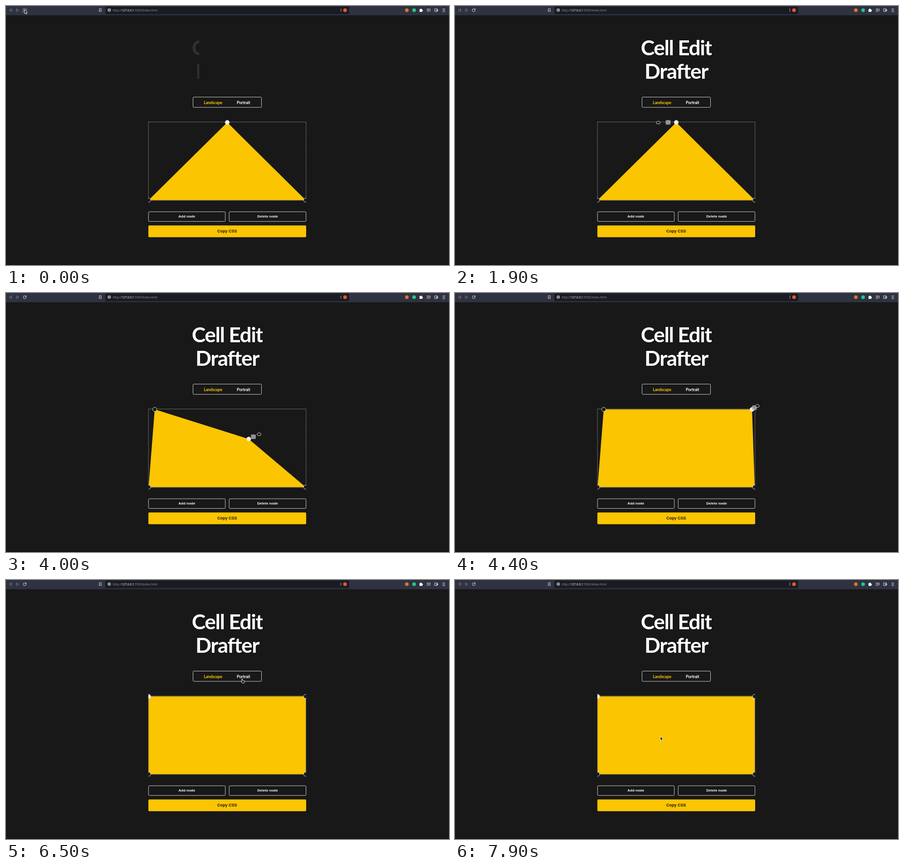
An HTML page for the animation above (8000 ms loop, 977x573 px).

```html
<!DOCTYPE html>
<html lang="en">
<head>
<meta charset="utf-8">
<title>Shape editor</title>
<style>
  html, body { margin: 0; width: 100%; height: 100%; overflow: hidden; background: #181818; }
  svg { display: block; }
  text { text-anchor: middle; font-weight: bold; fill: #fff; }
  .heading { font-family: Lato, sans-serif; letter-spacing: -.03em; }
  .button { font: bold 8px "Liberation Sans", Arial, sans-serif; }
  .url { font: 6.5px "Noto Sans", sans-serif; text-anchor: start; fill: #8b8d94; }
  .line { fill: none; stroke: #fff; stroke-width: .8; }
  .icon { fill: none; stroke: #dcdde2; }
  .gold { fill: #fbc502; }
</style>
</head>
<body>
<svg width="977" height="573" viewBox="0 0 977 573">
  <defs>
    <clipPath id="titleClip"><rect id="titleRect" x="410" y="60" height="120"/></clipPath>
    <clipPath id="stageClip"><rect x="314" y="240" width="348" height="210"/></clipPath>
  </defs>

  <rect width="977" height="20.5" fill="#2f3241"/>
  <rect x="219" y="1" width="538" height="17" rx="2" fill="#1a1c24"/>
  <rect y="572" width="977" height="1" fill="#0d0d0d"/>
  <g class="icon">
    <path d="M12.5 6v6.5l-5.5-3.3z M23 6v6.5l5.5-3.3z" stroke="#7d808c"/>
    <g id="reload">
      <circle cx="41.3" cy="9.2" r="3.2" stroke-dasharray="16 4"/>
      <path d="M45 5v3.5h-3.5z" fill="#dcdde2" stroke="none"/>
    </g>
    <g id="stop">
      <rect x="36" y="4" width="11" height="11" rx="1.5" fill="#50525f" stroke="none"/>
      <path d="M39 6.5l5 5m0-5l-5 5" stroke="#8b8d98"/>
    </g>
    <path d="M205.8 6h4.2v6.5l-2.1-1.7l-2.1 1.7z"/>
    <path d="M738.5 5.5v7" stroke="#aaa"/>
    <path d="M931 6v7" stroke-width="6" stroke-dasharray="1 1.6"/>
    <path d="M935.5 6v5.5"/>
    <path d="M945.2 6.2h6v6h-6z M949 8.4h3.5v2h-3.5z"/>
    <path d="M965.5 6v7" stroke-width="5.5" stroke-dasharray="1 2"/>
  </g>
  <g fill="#fff">
    <rect x="912" y="7" width="6" height="6"/>
    <circle cx="915" cy="7" r="1.3"/>
    <circle cx="918.2" cy="10" r="1.3"/>
  </g>
  <circle cx="227.7" cy="9" r="3.7" fill="#9b9da3"/>
  <path d="M227.7 6.8v4.5" stroke="#1a1c24" stroke-dasharray="2.8 .8"/>
  <text class="url" x="235.5" y="11.5">http://<tspan fill="#fff">127.0.0.1</tspan>:5500/index.html</text>
  <circle cx="747.7" cy="9.3" r="4" fill="#f1562b"/>
  <circle cx="884" cy="9.3" r="4" fill="#d9772b"/>
  <circle cx="900" cy="9.3" r="4" fill="#1fc98b"/>

  <g id="title" class="heading" font-size="46" clip-path="url(#titleClip)">
    <text x="488" y="109">Cell Edit</text>
    <text x="488" y="161">Drafter</text>
  </g>

  <rect class="line" x="412.5" y="201.5" width="151" height="22.7" rx="2"/>
  <g class="heading" font-size="9.2">
    <text id="landscape" x="456.5" y="216.5">Landscape</text>
    <text id="portrait" x="523.7" y="216.5">Portrait</text>
  </g>

  <polygon id="shape" class="gold"/>
  <rect id="frame" y="256.6" height="173.5" fill="none" stroke="#fff" stroke-width=".6" stroke-dasharray="1.5 1"/>
  <g id="nodes" clip-path="url(#stageClip)"></g>

  <g class="line">
    <rect id="add" x="314.3" y="455.2" width="169.4" height="21.4" rx="2"/>
    <rect x="492.2" y="455.2" width="169.4" height="21.4" rx="2"/>
  </g>
  <rect class="gold" x="314" y="485.5" width="348" height="26" rx="2"/>
  <g class="button">
    <text x="398.7" y="468.2">Add node</text>
    <text x="577" y="468.2">Delete node</text>
    <text x="487.8" y="501" style="font-size:9px;fill:#111">Copy CSS</text>
  </g>

  <g id="ghost">
    <rect x="-5.5" y="-5" width="11" height="10" fill="#aaa" opacity=".65"/>
    <circle r="4.3" fill="#999" stroke="#ddd" stroke-width=".8" opacity=".7"/>
  </g>
  <g id="cursor" fill="#111" stroke="#fff" stroke-width=".9" stroke-linejoin="round">
    <path id="arrow" d="M0 0v9l2-1.8l1.4 3.1l1.5-.7l-1.4-3h2.7z"/>
    <path id="hand" d="M0 1q.8-1.5 1.6 0v3l4.4 1l-.8 5h-4.2l-3-4l2 .5z"/>
    <path id="grab" d="M-2.7 3.3l-1.5-2.8q0-2 2-1.9q2.2-3 4.8-.6q2 .5 1.6 2.5l-1 2.8z"/>
  </g>
</svg>
<script>
const $ = id => document.getElementById(id);
const LOOP = 8000, STEP = 100, LAG = 120;
const LEFT = 314.5, RIGHT = 661, TOP = 257.5, BOTTOM = 429.5;
const GOLD = '#fbc502', WHITE = '#fff', DARK = '#181818';

// Places the pointer visits
const apex = [488, TOP], leaned = [328, TOP], centre = [488, 346];
const addButton = [400, 461], landscapeTab = [462, 218], portraitTab = [520, 218];

// When the pointer is where; straight moves in between
const route = [
  [0, [41, 8]], [900, [466, 231]], [1300, [500, 218]],
  [1800, apex], [2200, leaned], [2400, [353, 290]],
  [3000, addButton], [3400, addButton],
  [3630, centre], [4000, [558, 312]], [4300, [662, 249]], [4600, [676, 250]],
  [5200, leaned], [5380, leaned], [5600, [296, TOP]],
  [6400, portraitTab], [7100, portraitTab],
  [7500, landscapeTab], [7700, landscapeTab], [7900, [453, 346]]
];
const drags = [[1800, 2200], [3630, 4500], [5380, 5600]];

const clamp = (v, low, high) => Math.min(high, Math.max(low, v));
const mix = (a, b, f) => a.map((v, i) => v + (b[i] - v) * f);
const smooth = f => f * f * (3 - 2 * f);

function pointer(t) {
  const i = Math.max(1, route.findIndex(([time]) => time >= t));
  const [t0, from] = route[i - 1], [t1, to] = route[i];
  return mix(from, to, (t - t0) / (t1 - t0));
}

// A dragged node trails the pointer and stays inside the frame.
function dragged(t, [start, end]) {
  const [x, y] = pointer(clamp(t - LAG, start, end));
  return [clamp(x, LEFT, RIGHT), clamp(y, TOP, BOTTOM)];
}

function show(id, visible) {
  $(id).style.display = visible ? '' : 'none';
}

function place(id, [x, y]) {
  $(id).setAttribute('transform', `translate(${x} ${y})`);
}

function drawTitle(t) {
  const reveal = smooth(Math.min(1, (t + 220) / 1100));
  $('titleRect').setAttribute('width', 156 * reveal);
  $('title').setAttribute('opacity', reveal);
  show('stop', t < STEP);
  show('reload', t >= STEP);
}

function drawShape(t) {
  const first = dragged(t, drags[t < drags[2][0] ? 0 : 2]);
  const added = t >= 3200 ? [dragged(t, drags[1])] : [];
  const points = [first, ...added, [RIGHT, BOTTOM], [LEFT, BOTTOM]];
  const active = added.length && t < drags[2][1] ? 1 : 0;

  const tall = t >= 6600 && t < 7700;
  const scale = tall ? .296 : 1, middle = (LEFT + RIGHT) / 2;
  const fit = x => middle + (x - middle) * scale;
  const nodes = points.map(([x, y]) => [fit(x), y]);
  $('shape').setAttribute('points', nodes.join(' '));
  $('frame').setAttribute('x', fit(LEFT) - .3);
  $('frame').setAttribute('width', fit(RIGHT) - fit(LEFT) + 1);
  $('nodes').innerHTML = nodes.map(([x, y], i) =>
    `<circle cx="${x}" cy="${y}" r="4.6" stroke="#eee" stroke-width=".9" fill="${i === active ? '#f2edf2' : DARK}"/>`
  ).join('');
  $('landscape').style.fill = tall ? WHITE : GOLD;
  $('portrait').style.fill = tall ? GOLD : WHITE;
}

function drawPointer(t) {
  const at = pointer(t), [x, y] = at;
  const drag = drags.find(([start, end]) => t > start && t < end);
  const overAdd = y > 454 && y < 477 && x > 314 && x < 484;
  const overTab = y > 201 && y < 224 && x > 412 && x < 564;
  const pointing = overAdd || overTab;
  $('add').style.fill = overAdd ? '#2b2b2b' : 'none';
  place('cursor', at);
  show('grab', drag);
  show('hand', !drag && pointing);
  show('arrow', !drag && !pointing);
  show('ghost', drag);
  if (drag) place('ghost', mix(dragged(t, drag), at, .45));
}

function tick(now) {
  const t = Math.floor(now % LOOP / STEP) * STEP;
  drawTitle(t);
  drawShape(t);
  drawPointer(t);
  requestAnimationFrame(tick);
}
requestAnimationFrame(tick);
</script>
</body>
</html>
```
